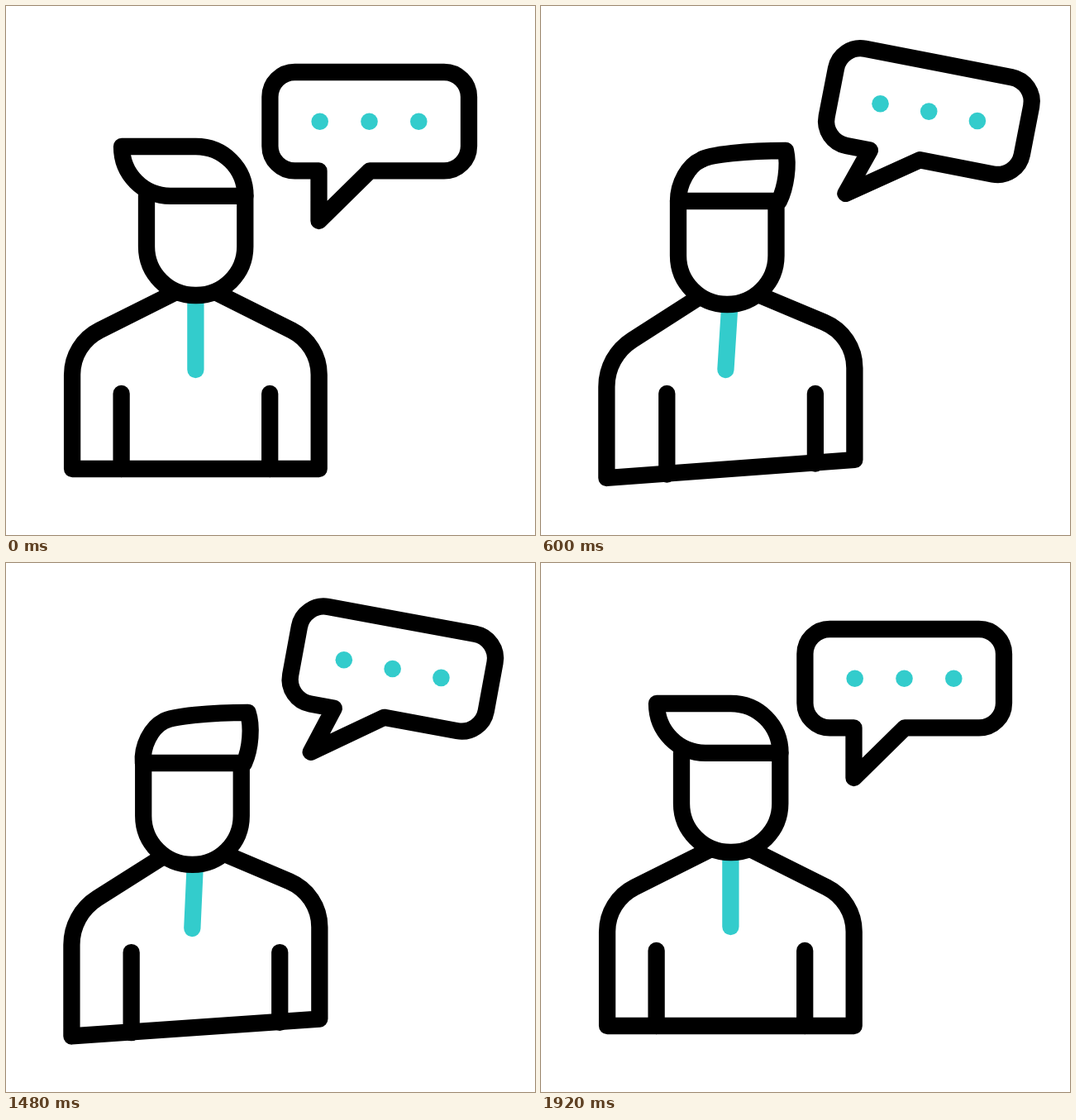
An HTML page with a canvas that plays this animation: 640x640 px, repeating every 2 s.

```html
<!DOCTYPE html>
<html lang="en">
<head>
<meta charset="utf-8">
<title>Talking person</title>
<style>
  html, body { margin: 0; width: 100%; height: 100%; overflow: hidden; background: #fff; }
  canvas { display: block; width: 100vw; height: 100vh; }
</style>
</head>
<body>
<canvas id="stage" width="640" height="640"></canvas>
<script>
const ctx = document.getElementById('stage').getContext('2d');
const LOOP = 2000, STEP = 40;
const INK = '#000', TEAL = '#33cccc', PAPER = '#fff';
const MID = 229.4;                       // centre line of the person
const TILT = 11 * Math.PI / 180, PIVOT = { x: 517.5, y: 288 };

const mix = (a, b, k) => a + (b - a) * k;

function ease(t, from, to) {
  const u = Math.min(1, Math.max(0, (t - from) / (to - from)));
  return u * u * (3 - 2 * u);
}

function stroke(color = INK) {
  ctx.strokeStyle = color;
  ctx.stroke();
}

function fillAndStroke() {
  ctx.fillStyle = PAPER;
  ctx.fill();
  stroke();
}

function line(x1, y1, x2, y2, color) {
  ctx.beginPath();
  ctx.moveTo(x1, y1);
  ctx.lineTo(x2, y2);
  stroke(color);
}

// Path through [x, y, radius] corners; no radius means a plain corner.
function roundPath(pts) {
  ctx.beginPath();
  pts.forEach(([x, y, r], i) => {
    if (r) ctx.arcTo(x, y, ...pts[i + 1].slice(0, 2), r);
    else ctx.lineTo(x, y);
  });
}

// Curve from a to b, pulled towards corner k like a quarter circle.
function bend(a, k, b) {
  const pull = p => [mix(p[0], k[0], 0.56), mix(p[1], k[1], 0.56)];
  ctx.bezierCurveTo(...pull(a), ...pull(b), ...b);
}

function drawBody(turn, dip) {
  const low = 11.5 * dip;
  const half = side => [
    [MID + side * (23.5 + 9.5 * turn), 346 + 3 * turn + low],
    [MID + side * (149.3 + 0.7 * turn), 409 + (2 - 13 * side) * turn + low, 60 + (side < 0 ? 7 * turn : 0)],
    [MID + side * (149.3 + 0.7 * turn), 560 - 11 * side * turn + low]
  ];
  const left = half(-1), right = half(1);
  // the right shoulder is rounded from the bottom upwards
  roundPath([...left, ...right.reverse()]);
  stroke();

  for (const side of [-1, 1]) {
    const x = MID + side * 89.8 + 12.7 * turn;
    line(x, 469 + low, x, 560 - 6.5 * side * turn + low);
  }
}

function drawHead(turn, dip) {
  const chin = 350 + 11 * turn + 25 * dip;
  const brow = 229.8 + 6.2 * turn + 35.5 * dip;
  const x1 = 170 - 4 * turn, x2 = 289.3 - 4.8 * turn;

  line(MID - turn + 2 * dip, chin, MID - 6 * turn + 9 * dip, 440 + low(dip), TEAL);
  roundPath([[x1, brow], [x1, chin, 59], [x2, chin, 59], [x2, brow]]);
  fillAndStroke();

  // hair: each point glides between the two facings, sinking with the dip
  const at = (ax, ay, bx, by, push = 0) =>
    [mix(ax, bx, turn) - push * dip, mix(ay, by, turn) + 34 * dip];
  const topLeft = at(140, 170, 194, 186);
  const topRight = at(229.5, 170, 296, 175);
  const baseRight = [mix(289.5, 288, turn), brow];
  const baseLeft = [mix(199, 166, turn) - 10 * dip, brow];
  ctx.beginPath();
  ctx.moveTo(...topLeft);
  bend(topLeft, at(185, 170, 212, 175), topRight);
  bend(topRight, at(289.5, 170, 303, 206), baseRight);
  ctx.lineTo(...baseLeft);
  bend(baseLeft, at(140, 229.5, 166, 198, 10), topLeft);
  ctx.closePath();
  fillAndStroke();
}

const low = dip => 11.5 * dip;

function drawBubble(turn, t) {
  const angle = TILT * turn, cos = Math.cos(angle), sin = Math.sin(angle);
  const [l, r, top, bottom] = [319.4, 560, 80, 199.4];
  ctx.save();
  ctx.translate(PIVOT.x, PIVOT.y);
  ctx.rotate(angle);
  ctx.translate(-PIVOT.x, -PIVOT.y);
  roundPath([
    [440, top], [r, top, 30], [r, bottom, 30], [440, bottom],
    [378.5 - 19 * turn, 260 - 3.5 * turn], [378.5, bottom],
    [l, bottom, 30], [l, top, 30], [440, top]
  ]);
  ctx.closePath();
  stroke();
  ctx.restore();

  ctx.fillStyle = TEAL;
  for (let i = 0; i < 3; i++) {
    const x = 379.7 + 59.8 * i - PIVOT.x, y = 139.7 - PIVOT.y;
    ctx.beginPath();
    ctx.arc(PIVOT.x + x * cos - y * sin,
            PIVOT.y + x * sin + y * cos + bounce(t - 33 * i), 10.3, 0, 2 * Math.PI);
    ctx.fill();
  }
}

// down, up, then back to rest
function bounce(t) {
  return 20 * ease(t, 560, 757) - 40 * ease(t, 757, 995) + 20 * ease(t, 995, 1290);
}

function draw(t) {
  const turn = ease(t, 120, 560) - ease(t, 1410, 1918);
  const dip = ease(t, 120, 310) - ease(t, 310, 570)
            + ease(t, 1410, 1670) - ease(t, 1670, 1918);
  ctx.fillStyle = PAPER;
  ctx.fillRect(0, 0, 640, 640);
  ctx.lineWidth = 20.3;
  ctx.lineCap = ctx.lineJoin = 'round';
  drawBody(turn, dip);
  drawHead(turn, dip);
  drawBubble(turn, t);
}

const start = performance.now();
function tick() {
  const t = (performance.now() - start) % LOOP;
  draw(Math.floor(t / STEP) * STEP);
  requestAnimationFrame(tick);
}
tick();
</script>
</body>
</html>
```
